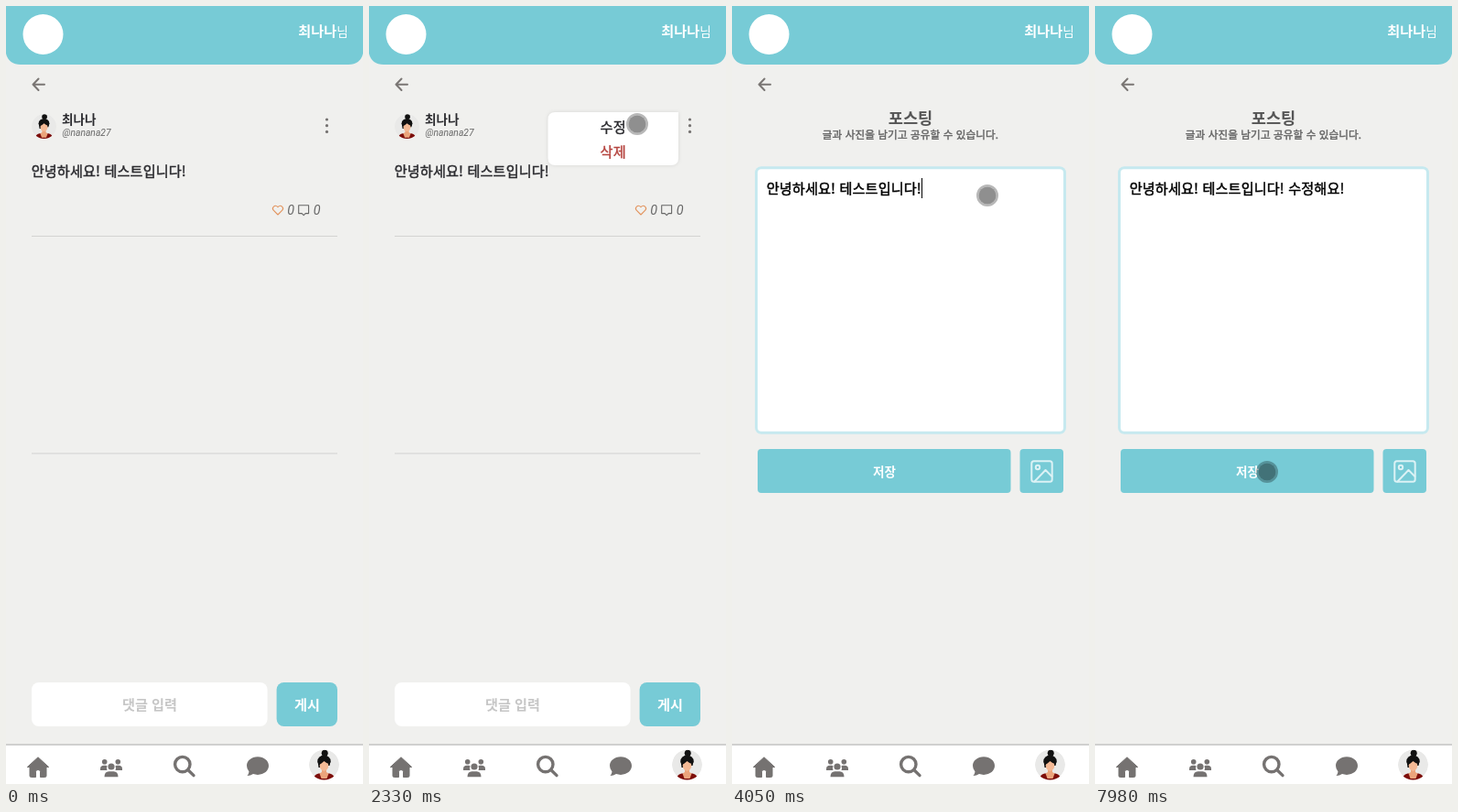
Write an HTML page that moves like this. It is 390 px wide and 850 px high and loops after 8000 ms.

```html
<!DOCTYPE html>
<html lang="ko">
<head>
<meta charset="utf-8">
<title>Post edit</title>
<style>
  html, body { margin: 0; width: 100%; height: 100%; overflow: hidden; background: #f0f0ee; }
  svg { display: block; }
  text {
    font: 400 15.2px "Noto Sans CJK KR", "Noto Sans CJK", sans-serif;
    color: #2b2b2f; fill: currentColor; white-space: pre;
  }
  /* medium weight: regular with a hairline outline */
  .medium { stroke: currentColor; stroke-width: .45px; letter-spacing: .1px; }
  .mid { text-anchor: middle; }
  .bold { font-weight: 700; }
  .small { font-size: 13.6px; }
  .white { color: #fff; }
  .latin { font: italic 400 10.3px Roboto, sans-serif; color: #666; }
  .count { font-size: 14.4px; }
  .teal { fill: #77cbd6; }
  .line { fill: none; stroke-linecap: round; stroke-linejoin: round; }
  .icon { fill: #757271; }
  .rule { fill: #d3d3d1; }
  #menu { filter: drop-shadow(0 0 2px rgba(0, 0, 0, .1)); }
  #core { fill: rgba(0, 0, 0, .44); }
  #rim { fill: none; stroke: rgba(0, 0, 0, .28); stroke-width: 2.5; }
  .press #core { fill: #c5c546; }
  .press #rim { stroke: #dcdc82; }
</style>
</head>
<body>
<svg width="390" height="850" viewBox="0 0 390 850">
  <defs>
    <clipPath id="round"><circle r="16.5"/></clipPath>
    <g id="avatar" clip-path="url(#round)">
      <circle r="16.5" fill="#e9e9e8"/>
      <path d="M-12 17Q-12 11-6 9.500H6Q12 11 12 17z" fill="#7d0e0b"/>
      <path d="M-2.500 3H2.500V8L5 9.500 3 15H-3L-5 9.500-2.500 8z" fill="#eba47c"/>
      <g fill="#111">
        <circle cx=".7" cy="-12.700" r="3.500"/>
        <ellipse cy="-4" rx="7.200" ry="6.500"/>
        <path d="M-7-4L-6 3H-3V-4zM7-4L6 1H4V-4z"/>
      </g>
      <ellipse cy="1" rx="4.800" ry="5.800" fill="#f4b995"/>
      <path d="M-6 0Q-3-1 0-4 3-1 6-1V-7H-6z" fill="#111"/>
    </g>
  </defs>

  <rect width="390" height="850" fill="#f0f0ee"/>
  <path class="teal" d="M0 0H390V52Q387 64 374 64H16Q3 64 0 52z"/>
  <circle cx="40.5" cy="31" r="22" fill="#fff"/>
  <text class="bold white" x="319.3" y="33">최나나</text>
  <text class="small white" x="361.3" y="32.5">님</text>
  <path class="line" d="M42 85.700H30M35.500 79.500L29.500 85.700 35.500 92" stroke="#7a7674" stroke-width="2"/>

  <g id="post">
    <use href="#avatar" transform="translate(41.5 131.5) scale(.82)"/>
    <text class="bold small" x="61" y="129">최나나</text>
    <text class="latin" x="61.5" y="142">@nanana27</text>
    <g class="icon">
      <circle cx="350.5" cy="124" r="1.6"/><circle cx="350.5" cy="130.7" r="1.6"/><circle cx="350.5" cy="137.4" r="1.6"/>
    </g>
    <text class="medium" x="27.7" y="186">안녕하세요! 테스트입니다!</text>
    <path class="line" d="M297 228L292.2 223.2C289.8 220.3 293.8 216.2 297 219.7 300.2 216.2 304.2 220.3 301.8 223.2z" stroke="#e2935c" stroke-width="1.1"/>
    <text class="latin count" x="307.2" y="227.5">0</text>
    <path class="line" d="M319.7 217.8H330.6V226.6H327.2L325.2 228.6 323.2 226.6H319.7z" stroke="#666" stroke-width="1.1"/>
    <text class="latin count" x="335.7" y="227.5">0</text>
    <rect class="rule" x="28" y="251" width="334" height="1"/>
    <rect class="rule" x="28" y="488.4" width="334" height="1"/>
    <rect x="28" y="739" width="257.6" height="48" rx="8" fill="#fff"/>
    <text class="bold mid" x="157" y="768.7" style="color:#c6c6c6">댓글 입력</text>
    <rect class="teal" x="295.6" y="739" width="66.4" height="48" rx="8"/>
    <text class="bold white mid" x="329" y="768.7">게시</text>
    <g id="menu">
      <path d="M203.5 116H338V166Q338 174 330 174H203.5Q195.5 174 195.5 166V124Q195.5 116 203.5 116z" fill="#fff"/>
      <text class="medium mid" x="266.7" y="137.7">수정</text>
      <text class="medium mid" x="266.7" y="164.7" style="color:#b5443f">삭제</text>
    </g>
  </g>

  <g id="edit">
    <text class="bold mid" x="195" y="128.8" style="font-size:17.6px;color:#555">포스팅</text>
    <text class="medium mid" x="195" y="145" style="font-size:11.6px;color:#666">글과 사진을 남기고 공유할 수 있습니다.</text>
    <rect id="ring" x="25" y="175.3" width="340" height="292.4" rx="7" fill="#c6e9ef"/>
    <rect x="28" y="178.3" width="334" height="286.4" rx="4" fill="#fff"/>
    <text id="body" class="medium" x="37.7" y="205" xml:space="preserve" style="color:#000"></text>
    <rect id="under" y="209" width="13.5" height="1"/>
    <rect id="caret" y="188" width="1" height="22"/>
    <rect class="teal" x="28" y="484" width="276.5" height="48" rx="4"/>
    <text class="bold small white mid" x="166.5" y="513.8">저장</text>
    <rect class="teal" x="314.5" y="484" width="47.5" height="48" rx="4"/>
    <g class="line" stroke="#dcf2f5" stroke-width="2">
      <rect x="327.3" y="497.3" width="22.4" height="22.4" rx="2.5"/>
      <circle cx="334" cy="504" r="2.2"/>
      <path d="M330.5 519.5L342.5 507 349.5 514"/>
    </g>
  </g>

  <rect y="806" width="390" height="44" fill="#fff"/>
  <rect y="806" width="390" height="2" fill="#d0d0cf"/>
  <g class="icon">
    <path d="M35 820.8L23.3 831.5H26V841q0 1.5 1.5 1.5h5v-6q0-2 2.5-2t2.5 2v6h5q1.5 0 1.5-1.5V831.5H46.7z" stroke="#757271" stroke-linejoin="round"/>
    <circle cx="107.7" cy="825.7" r="2.8"/><circle cx="122.3" cy="825.7" r="2.8"/><circle cx="115" cy="831" r="3.6"/>
    <path d="M103 835v-1.5q0-3.7 4-3.7h2q1 0 1.5.5-1 2.5 0 4.7zM127 835v-1.5q0-3.7-4-3.7h-2q-1 0-1.5.5 1 2.5 0 4.7zM107.5 842.3q0-6 5-6h5q5 0 5 6z"/>
    <path d="M275 820.3c7 0 12 4.4 12 9.8s-5 9.8-12 9.8q-2.7 0-5-.8-2.8 2-6.5 2 1.7-1.9 2-4.5Q263 833.8 263 830.1c0-5.4 5-9.8 12-9.8z"/>
  </g>
  <g class="line" stroke="#757271" stroke-width="3.4">
    <circle cx="192.8" cy="828.6" r="8.2"/>
    <path d="M199 834.8L205 840.6"/>
  </g>
  <use href="#avatar" transform="translate(347.5 829)"/>

  <g id="cursor"><circle id="core" r="9.5"/><circle id="rim" r="10.75"/></g>
</svg>
<script>
  const LOOP = 8000, STEP = 70, BLINK = 530;
  const $ = id => document.getElementById(id);
  const [post, menu, edit, ring, body, under, caret, cursor] =
    ['post', 'menu', 'edit', 'ring', 'body', 'under', 'caret', 'cursor'].map($);

  // time, x, y
  const path = [
    [130, 381, 846], [270, 386, 620], [410, 384, 400], [550, 379, 225], [690, 373, 149],
    [760, 364, 137], [830, 356, 129], [900, 352, 125], [970, 351, 124], [1160, 351, 124],
    [1300, 350, 130], [1770, 350, 130], [2330, 293, 129], [2600, 270, 128], [2880, 270, 128],
    [3500, 227.5, 204.5], [3700, 227.5, 204.5], [4050, 279, 207], [7440, 279, 207],
    [7700, 240, 345], [7980, 188, 509]
  ];
  const presses = [[1440, 1640], [2670, 2740], [3570, 3700]];
  // each entry is the tail of the message after a keystroke
  const keys = [
    [3850, ''], [5370, ' '], [5500, ' ㅅ'], [5600, ' 수'], [5700, ' 숮'], [5840, ' 수저'],
    [5970, ' 수정'], [6100, ' 수정ㅎ'], [6240, ' 수정해'], [6500, ' 수정행'],
    [6570, ' 수정해요'], [7030, ' 수정해요!']
  ];

  const show = (el, on) => el.setAttribute('display', on ? 'inline' : 'none');
  const within = (t, a, b) => t >= a && t < b;

  function position(t) {
    const i = path.findLastIndex(p => p[0] <= t);
    const a = path[Math.max(i, 0)], b = path[i + 1];
    if (i < 0 || !b) return a.slice(1);
    const held = Math.floor((t - a[0]) / STEP) * STEP;
    const k = held / (b[0] - a[0]);
    return [1, 2].map(n => a[n] + (b[n] - a[n]) * k);
  }

  function type(t) {
    const [since, tail] = keys.findLast(k => k[0] <= t) || [LOOP, ''];
    const text = '안녕하세요! 테스트입니다!' + tail;
    if (body.textContent !== text) body.textContent = text;
    const end = 37.7 + body.getComputedTextLength();
    caret.setAttribute('x', Math.round(end));
    under.setAttribute('x', Math.round(end - 13.5));
    show(caret, t >= since && (t - since) % (2 * BLINK) < BLINK);
    show(under, /[ㄱ-힣]$/.test(tail));
  }

  function draw(t) {
    const editing = t >= 2950;
    show(post, !editing);
    show(edit, editing);
    show(menu, t >= 1840);
    show(ring, t >= 3700);
    if (editing) type(t);
    show(cursor, t >= 130 && !within(t, 6830, 7100));
    cursor.setAttribute('transform', `translate(${position(t)})`);
    cursor.classList.toggle('press', presses.some(p => within(t, ...p)));
  }

  const start = performance.now();
  function tick() {
    draw((performance.now() - start) % LOOP);
    requestAnimationFrame(tick);
  }
  tick();
</script>
</body>
</html>
```
